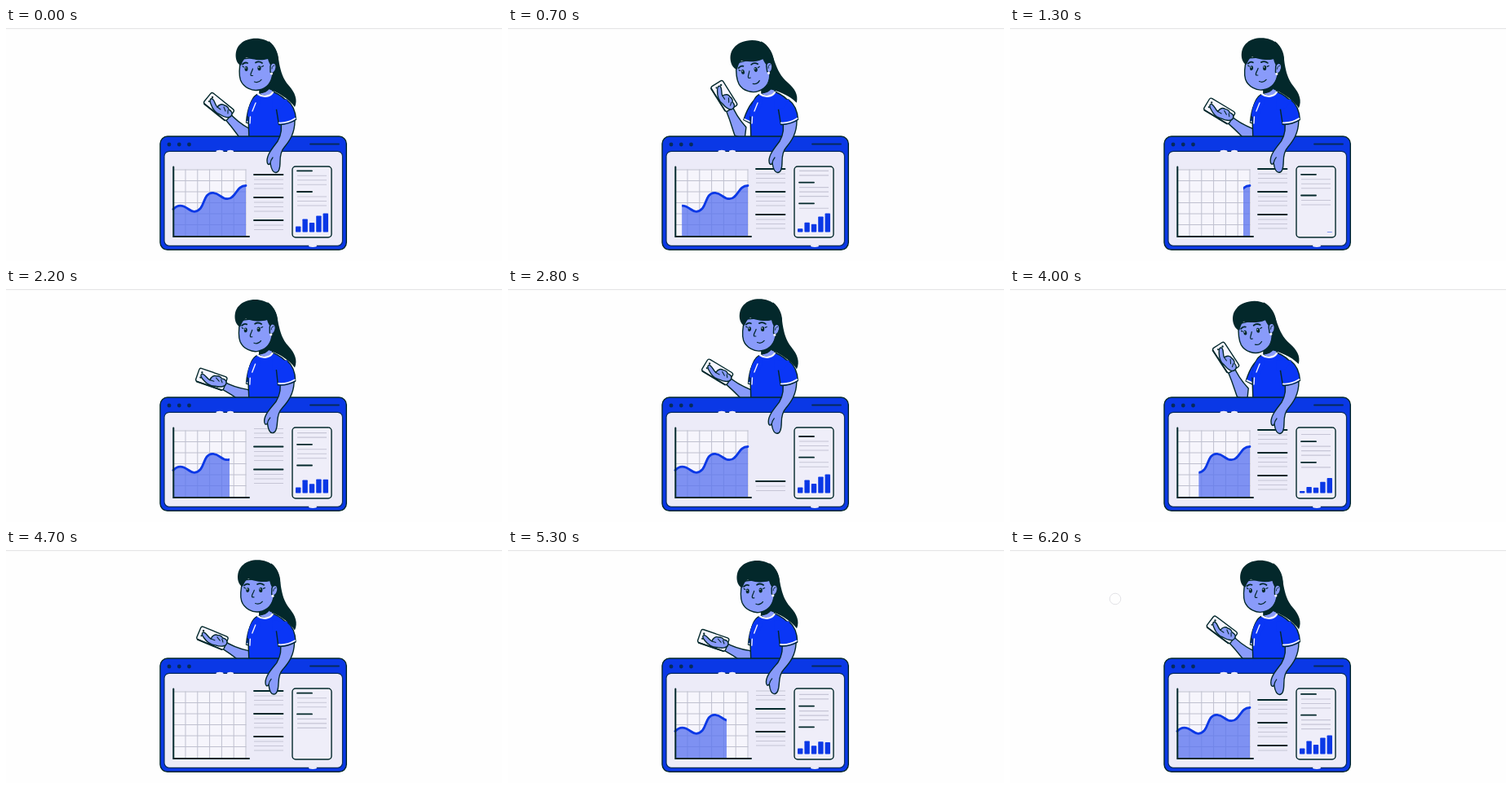
Write an HTML page that moves like this. It is 608 px wide and 286 px high and loops after 6.3 s.

```html
<!DOCTYPE html>
<html lang="en">
<head>
<meta charset="utf-8">
<title>Dashboard</title>
<style>
html, body { margin: 0; width: 100%; height: 100%; overflow: hidden; background: #fefefe; }
svg { display: block; width: 100vw; height: 100vh; }
.ink { fill: #03282b; }
.blue { fill: #0a38e6; }
.shirt { fill: #0a36f6; }
.skin { fill: #899bfa; }
.pane { fill: #ecebf8; }
.edge { stroke: #03282b; stroke-width: 1.4; stroke-linejoin: round; stroke-linecap: round; }
.line { fill: none; stroke: #03282b; stroke-linecap: round; }
.white { fill: none; stroke: #f4f4ff; stroke-linecap: round; stroke-linejoin: round; }
.grid { fill: none; stroke: #bfc0cf; stroke-width: 1; }
.pale { fill: none; stroke: #c6c5d6; stroke-width: 1.1; }
</style>
</head>
<body>
<svg viewBox="0 0 608 286" xmlns="http://www.w3.org/2000/svg">
  <defs>
    <clipPath id="waveClip"><rect id="wipe" y="170" height="86"/></clipPath>
    <clipPath id="listClip"><rect x="300" y="170" width="44" height="80"/></clipPath>
    <clipPath id="docClip"><rect x="353" y="174" width="44" height="48"/></clipPath>
  </defs>
  <rect width="608" height="286" fill="#fefefe"/>
  <rect width="608" height="1.3" fill="#e6e6e8"/>
  <circle id="ring" cx="129" cy="60" r="6.8" fill="#fefefe" stroke="#e2e2e6"/>

  <!-- phone arm -->
  <g id="upperArm">
    <g id="forearm">
      <path class="skin edge" d="M262 104 C268 111 276 120 289 138 L302 138 L299 124 C290 119 281 113 273 103 Z"/>
      <g transform="translate(261 96.5) rotate(39)">
        <rect class="edge" x="-18" y="-8.5" width="36" height="17" rx="2.6" fill="#f6f6ff"/>
        <path class="line" stroke-width="1.8" d="M-16 8.7H16"/>
        <circle class="ink" cx="-13.5" cy="-4" r="1.2"/>
        <circle class="ink" cx="-13.5" cy="2.6" r="1"/>
      </g>
      <path class="skin edge" d="M262 106 C256 104 253 99 251 93 C249 88 251 86 253 87 C256 89 256 94 259 97
        C262 93 266 93 268 95 C272 96 273 99 273 100 C277 102 278 105 276 108 C274 111 268 110 262 106 Z"/>
      <path class="line" stroke-width="1.1" d="M259 97 L263 100 M267 97 L269 102 M272 101 L272 105"/>
    </g>
    <path class="shirt edge" d="M309 83 C300 87 296 98 294.500 116 L306 119 L312 96 Z"/>
    <path class="white" stroke-width="1.7" d="M295.500 115 L305 117"/>
  </g>

  <!-- torso -->
  <g id="torso">
    <path class="shirt edge" d="M309 81 C302 84 298 94 297 109 L298 140 H347 L350 112 C352 99 346 86 327 78 Z"/>
    <path class="shirt" d="M309 82 C302 85 297 95 296 108 L303 112 L313 90 Z"/>
    <path class="white" stroke-width="1.4" d="M306 92 L302 102 M299.500 109 L299 117"/>
    <path class="skin edge" d="M312 68 L311 81 C315 85 323 84 327 79 L328 66 Z"/>
    <path class="ink" d="M310 70 L310.500 80 C317 81 324 76 328 67 Z"/>
    <path class="white" stroke-width="2.3" d="M309 81 C314 85 323 85 327 79"/>
  </g>

  <!-- head -->
  <g id="head">
    <path class="ink" d="M322 32 C326 45 324 60 322 75 C333 79 346 86 354 97 C358 88 354 79 347 71
      C339 62 337 53 335 44 C333 32 331 22 322 16 Z"/>
    <path class="skin edge" d="M288 38 C286 48 285 57 287.500 64 C291 73 302 78 310 76 C320 74 326 66 327 55 L327 34 Z"/>
    <path class="ink" d="M288 46 C280 43 279 26 288 19 C296 11 316 10 326 20 C333 27 335 36 334 46 L327 49
      C324 46 322 42 321 38 C311 41 300 38 295 36 C291 38 290 42 288 46 Z"/>
    <path class="skin edge" d="M324 47 C325 41 332 42 331 49 C330 55 326 57 324 54 Z"/>
    <path class="line" stroke-width=".9" d="M326 50 Q326 46 329 46"/>
    <circle cx="325.5" cy="56" r="1.6" fill="#f4f4ff"/>
    <path class="line" stroke-width="1.8" d="M290 44.500 Q293 41.500 296 43 M306 42.500 Q310 40 314 43"/>
    <g class="ink">
      <ellipse cx="294.5" cy="50" rx="2" ry="2.9"/>
      <ellipse cx="310.5" cy="49.3" rx="2.1" ry="3"/>
    </g>
    <g fill="#dfe4ff">
      <circle cx="294" cy="48.9" r=".7"/>
      <circle cx="309.9" cy="48.2" r=".7"/>
    </g>
    <path class="line" stroke-width="1.2" d="M291.500 48 L290 47 M313.500 47.500 L315.500 46.500 M302.500 50 C301.500 54 298.500 57 300.500 58.500 L302.500 58.500 M304.500 66 Q309.500 68 313 63.500"/>
  </g>

  <!-- browser window -->
  <rect class="blue edge" x="189" y="133" width="228.3" height="139.3" rx="9"/>
  <rect class="pane" x="194" y="151.3" width="218.5" height="116" rx="6" stroke="#062a5c" stroke-width="1.2"/>
  <g class="pane">
    <ellipse cx="262" cy="151.5" rx="4.5" ry="1.7"/>
    <ellipse cx="275" cy="151.5" rx="4" ry="1.7"/>
    <ellipse cx="376" cy="267.3" rx="5" ry="1.7"/>
  </g>
  <g fill="#062a5c">
    <circle cx="200" cy="143" r="2.4"/><circle cx="212.3" cy="143" r="2.4"/><circle cx="224.5" cy="143" r="2.4"/>
  </g>
  <path d="M373 142.500H408" stroke="#062a5c" stroke-width="1.8" stroke-linecap="round"/>

  <!-- area chart -->
  <rect x="205" y="173.5" width="89.5" height="82" fill="#f6f5fc"/>
  <path id="grid" class="grid"/>
  <g clip-path="url(#waveClip)">
    <path id="area" fill="#5a74f0" fill-opacity=".77"/>
    <path id="wave" fill="none" stroke="#0a38e6" stroke-width="2.8" stroke-linecap="round"/>
  </g>
  <path class="line" stroke-width="2" d="M205.300 170.500V256H298"/>

  <g clip-path="url(#listClip)"><g id="list"></g></g>

  <!-- document -->
  <rect class="edge" x="351" y="170" width="48" height="87" rx="4" fill="#efeef9"/>
  <g clip-path="url(#docClip)"><g id="doc"></g></g>
  <g id="bars" class="blue"></g>

  <!-- resting arm -->
  <g id="arm">
    <path class="skin edge" d="M336 112 C339 122 338 130 333 139 C327 147 320 155 320 163 C320 167 322 169 324 166
      C325 172 327 177.500 330.500 177.500 C334.500 177.500 336 171 336 164 C336 157 337 151 341 146.500 C348 138 354 129 354 114 Z"/>
    <path class="line" stroke-width="1.2" d="M324 166 Q324.500 162 327 159"/>
    <path class="shirt edge" d="M330 92 C332 102 333 110 334.500 118.500 Q345 119 355.500 112.500 C355 104 352 94 344 88 Z"/>
    <path class="shirt" d="M326 87 L345 88 L338 98 L327 101 Z"/>
    <path class="white" stroke-width="1.8" d="M335 116.500 Q345 117 354.500 111"/>
  </g>
</svg>
<script>
const LOOP = 6300, CYCLE = 3150, STEP = 100;
const $ = id => document.getElementById(id);
const clamp = x => Math.min(1, Math.max(0, x));
const ramp = (t, start, length) => clamp((t - start) / length);

// Smooth monotone curve through [time, value] points.
function curve(points, t) {
  const slope = i => (points[i + 1][1] - points[i][1]) / (points[i + 1][0] - points[i][0]);
  const last = points.length - 1;
  const tangent = i => {
    if (i === 0) return slope(0);
    if (i === last) return slope(last - 1);
    const a = slope(i - 1), b = slope(i);
    return a * b > 0 ? 2 * a * b / (a + b) : 0;
  };
  let i = 0;
  while (i < last - 1 && t >= points[i + 1][0]) i++;
  const [t0, a] = points[i], [t1, b] = points[i + 1];
  const d = t1 - t0, u = (t - t0) / d, v = 1 - u;
  return v * v * ((1 + 2 * u) * a + u * d * tangent(i)) +
         u * u * ((3 - 2 * u) * b - v * d * tangent(i + 1));
}

const lift = [[0, 0], [450, 14], [700, 19], [850, 18], [1300, -8], [1800, -20.5], [2150, -20], [2800, -8], [3050, -2], [CYCLE, 0]];
const nod = [[0, 0], [450, -7], [700, -8.5], [850, -8], [1300, 2], [1550, 2.2], [2150, -1], [2800, 2], [3050, .5], [CYCLE, 0]];
const sway = [[0, 0], [850, 0], [1300, .7], [2000, 3.5], [2200, 3], [2800, .7], [CYCLE, 0]];
const scroll = [[0, 7], [300, 1.5], [600, 0], [1800, 0], [2150, -6], [2200, -7.5], [2450, -45], [2680, -82], [2800, -101], [3050, -153], [CYCLE, -157]];
const barHeights = [7, 16, 11.5, 20, 23];
const PITCH = 25.7;

// Paragraphs: one dark heading and three pale lines each.
function paragraphs(x, y, pitch, wide, heading) {
  let out = "";
  for (let k = 0; k < 3; k++) {
    const top = y + k * pitch;
    out += `<path class="line" stroke-width="1.8" d="M${x} ${top}h${heading}"/>`;
    for (const gap of [6, 11.5, 17]) out += `<path class="pale" d="M${x} ${top + gap}h${wide}"/>`;
  }
  return out;
}

function build() {
  let d = "";
  for (let k = 0; k < 6; k++) d += `M205 ${174 + k * 13.5}H294.5M${220 + k * 14.8} 173.500V256`;
  $("grid").setAttribute("d", d);
  const wave = "M205 222.500C209 218 214 217.500 218 219C225 222 226 225.500 231 225.300" +
    "C245 224 240 203 253 202.300C262 202 263 209.700 271.500 209.700C282 209.500 282 193.500 294 193.500";
  $("wave").setAttribute("d", wave);
  $("area").setAttribute("d", wave + "V256H205Z");
  $("list").innerHTML = paragraphs(304, 173, 28, 36, 35.5);
  $("doc").innerHTML = paragraphs(357, 175.3, PITCH, 36, 18);
  $("bars").innerHTML = barHeights.map((h, i) => `<rect x="${355 + i * 8.4}" width="6.4" rx=".8"/>`).join("");
}

function turn(id, angle, x, y) {
  $(id).setAttribute("transform", `rotate(${angle.toFixed(2)} ${x} ${y})`);
}

function draw(time) {
  const t = time % CYCLE;

  const raise = curve(lift, t), swing = curve(sway, t), tilt = curve(nod, t);
  const shoulder = Math.max(0, raise * .7);
  turn("upperArm", shoulder, 306, 90);
  turn("forearm", raise - shoulder, 297, 130);
  turn("head", tilt, 318, 96);
  turn("arm", swing, 345, 98);
  turn("torso", swing * -.15, 320, 140);

  const back = t >= 1500;
  const left = 202 + (back ? 0 : 95 * ramp(t, 608, 783));
  const right = back ? 205 + 92 * ramp(t, 1625, 767) : 297;
  $("wipe").setAttribute("x", left);
  $("wipe").setAttribute("width", back && t < 1625 ? 0 : Math.max(0, right - left));

  let shift = curve(scroll, t);
  if (shift < -82) shift += 164;
  $("list").setAttribute("transform", `translate(0 ${shift.toFixed(2)})`);
  $("doc").setAttribute("transform", `translate(0 ${(-PITCH * (t / 1575 % 1)).toFixed(2)})`);

  [...$("bars").children].forEach((bar, i) => {
    const size = back ? ramp(t, 1560 + 65 * i, 520) : 1 - ramp(t, 480 + 65 * i, 570);
    const h = barHeights[i] * size;
    bar.setAttribute("y", 250.5 - h);
    bar.setAttribute("height", h);
  });

  $("ring").style.display = time >= 6000 ? "" : "none";
}

build();
const begin = performance.now();
function tick() {
  const time = (performance.now() - begin) % LOOP;
  draw(Math.floor(time / STEP) * STEP);
  requestAnimationFrame(tick);
}
tick();
</script>
</body>
</html>
```
